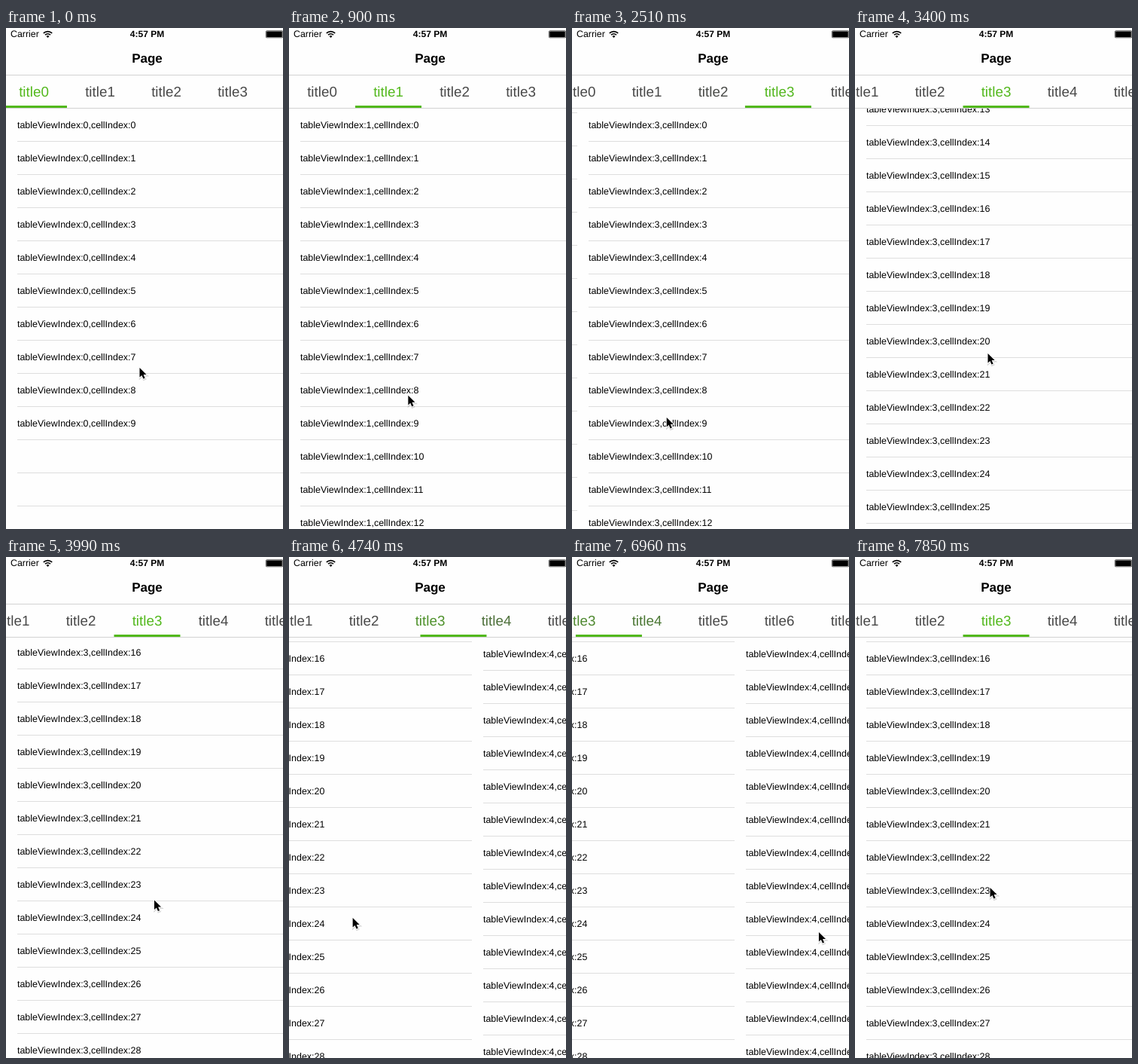
Animation of 368 by 665 pixels, one loop 8000 ms. Source, as an HTML page:

```html
<!DOCTYPE html>
<html lang="en">
<head>
<meta charset="utf-8">
<title>Paged tables</title>
<style>
html, body { margin: 0; width: 100%; height: 100%; overflow: hidden; background: #fefefe; }
body {
  position: relative; color: #000; white-space: nowrap;
  font-family: "Liberation Sans", Arial, sans-serif;
  text-rendering: geometricPrecision;
}
div, svg { position: absolute; }
#stage { left: 0; top: 0; width: 368px; height: 665px; overflow: hidden; }
.bar { left: 0; width: 375px; text-align: center; }
.rule { left: 0; width: 375px; height: 1px; background: #d2d2d2; }
#carrier { left: 6px; top: 0; font-size: 12.4px; line-height: 17px; }
#clock { top: 0; font-weight: bold; font-size: 12px; line-height: 17px; }
#heading { top: 20px; font-weight: bold; font-size: 17px; line-height: 41px; }
#tabs { left: 0; top: 63px; height: 43px; }
.tab { top: 0; width: 88px; text-align: center; font-size: 18.8px; line-height: 43px; }
#marker { left: 0; top: 40px; width: 88px; height: 3px; background: #52b81c; }
#lists { left: 0; top: 107px; width: 375px; height: 558px; overflow: hidden; }
#pages { left: 0; top: 0; }
.page { top: 0; width: 375px; height: 558px; overflow: hidden; }
.table {
  left: 15px; top: 0; width: 360px; height: 1408px;
  background: repeating-linear-gradient(transparent 0 43px, #dedede 43px 44px);
}
.cell { left: 0; font-size: 12.45px; line-height: 44px; }
#icons, #cursor { left: 0; top: 0; overflow: visible; }
</style>
</head>
<body>
<div id="stage">
  <div id="lists"><div id="pages"></div></div>
  <div id="carrier">Carrier</div>
  <div id="clock" class="bar">4:57 PM</div>
  <div id="heading" class="bar">Page</div>
  <div class="rule" style="top:62px"></div>
  <div class="rule" style="top:106px"></div>
  <div id="tabs"><div id="marker"></div></div>
  <svg id="icons" width="368" height="20">
    <g fill="none" stroke="#000" stroke-width="1.7">
      <path d="M49.8 6.9a8.2 8.2 0 0 1 11.4 0M52 9.2a5 5 0 0 1 7 0"/>
      <path d="M55.5 13l-2-2.1a2.9 2.9 0 0 1 4 0z" fill="#000" stroke="none"/>
    </g>
    <rect x="345.4" y="3.8" width="22.4" height="9" rx="1" fill="none" stroke="#222" stroke-width=".8"/>
    <rect x="346.2" y="4.6" width="20.6" height="7.4" rx=".5"/>
  </svg>
  <svg id="cursor" width="14" height="20">
    <defs><path id="arrow" d="M.5 1V13.6L3.4 10.9L5.4 15.6L7.6 14.7L5.6 10H9.6Z"/></defs>
    <use href="#arrow" x=".5" y="1.2" fill="none" stroke="#000" stroke-opacity=".16" stroke-width="2.4"/>
    <use href="#arrow" stroke="#fff" stroke-width="1.8" paint-order="stroke"/>
  </svg>
</div>
<script>
const LOOP = 8000, STEPS = 54, STEP = LOOP / STEPS;
const PAGE_WIDTH = 375, TAB_WIDTH = 88, ROW = 44, SCROLL_END = 698;
const SWIPE = 2.5, DRAG = 1.4, RECENTRE = 2;   // durations in steps
const GREEN = [82, 184, 28], GREY = [72, 72, 72];

// Each swipe brings in a page while the pointer drags from one x to another.
const swipes = [
  { at: 3.5, page: 1, from: 280, to: 90, y: 478 },
  { at: 9.035, page: 2, from: 345, to: 258, y: 511 },
  { at: 14.7, page: 3, from: 290, to: 110, y: 500 },
  { at: 31, page: 4, from: 217, to: 31, y: 478 },
  { at: 36.625, page: 5, from: 264, to: 64, y: 477 },
  { at: 43, page: 4, from: 110, to: 290, y: 495 },
  { at: 45.625, page: 3, from: 131, to: 331, y: 497 }
];
const FLICK = 20;

const ease = u => { u = Math.min(1, Math.max(0, u)); return u * u * (3 - 2 * u); };
const mix = (a, b, u) => a + (b - a) * u;
const glide = (moves, first, duration, step) =>
  moves.reduce((value, m) => mix(value, m.value, ease((step - m.at) / duration)), first);

const pageMoves = swipes.map(s => ({ at: s.at, value: s.page }));

// The tab strip centres the chosen title once a swipe has come to rest.
const tabCentre = page => Math.max(0, (page + .5) * TAB_WIDTH - PAGE_WIDTH / 2);
const tabMoves = [{ at: -1, value: 0 }].concat(swipes
  .filter((s, i) => i + 1 === swipes.length || swipes[i + 1].at > s.at + 3)
  .map(s => ({ at: s.at + 3, value: tabCentre(s.page) })));

const pointer = [
  { at: 0, x: 177, y: 450 },
  ...swipes.flatMap(s => [{ at: s.at, x: s.from, y: s.y }, { at: s.at + DRAG, x: s.to, y: s.y }]),
  { at: FLICK, x: 176, y: 569 },
  { at: FLICK + 1, x: 176, y: 431 },
  { at: FLICK + 3, x: 176, y: 431 },
  { at: FLICK + 9, x: 217, y: 478 },
  { at: STEPS - 1, x: 179, y: 438 }
].sort((a, b) => a.at - b.at);

function pointerAt(step) {
  const next = Math.max(1, pointer.findIndex(p => p.at >= step));
  const a = pointer[next - 1], b = pointer[next];
  const u = (step - a.at) / (b.at - a.at);
  return [mix(a.x, b.x, u), mix(a.y, b.y, u)];
}

// Drag, then decaying momentum, then a critically damped bounce at the end.
function flick(step) {
  const ms = (step - FLICK - 1) * STEP, hit = 395;
  if (ms < 0) return 137 * Math.max(0, step - FLICK);
  if (ms < hit) return 137 + 1020 * (1 - Math.pow(.998, ms));
  const s = (ms - hit) / 1000;
  return SCROLL_END + 1000 * s * Math.exp(-10.9 * s);
}

const byId = id => document.getElementById(id);
function add(parent, className, text = "") {
  const el = document.createElement("div");
  el.className = className;
  el.textContent = text;
  return parent.appendChild(el);
}
const move = (el, x, y = 0) => { el.style.transform = `translate(${x}px, ${y}px)`; };

const pages = byId("pages"), tabs = byId("tabs"), marker = byId("marker"), cursor = byId("cursor");
const tables = Array.from({ length: 6 }, (_, index) => {
  const page = add(pages, "page");
  page.style.left = index * PAGE_WIDTH + "px";
  const table = add(page, "table");
  for (let i = 0; i < (index ? 30 : 10); i++) {
    add(table, "cell", `tableViewIndex:${index},cellIndex:${i}`).style.top = i * ROW + "px";
  }
  return table;
});
const titles = Array.from({ length: 10 }, (_, i) => {
  const tab = add(tabs, "tab", "title" + i);
  tab.style.left = i * TAB_WIDTH + "px";
  return tab;
});
move(tables[2], 0, -SCROLL_END);

function draw(step) {
  const page = glide(pageMoves, 0, SWIPE, step);
  move(pages, -Math.round(page * PAGE_WIDTH));
  move(tables[3], 0, -Math.round(flick(step)));
  move(tabs, -glide(tabMoves, 14, RECENTRE, step));
  move(marker, page * TAB_WIDTH);
  titles.forEach((tab, i) => {
    const share = Math.max(0, 1 - Math.abs(page - i));
    tab.style.color = `rgb(${GREY.map((c, j) => Math.round(mix(c, GREEN[j], share)))})`;
  });
  move(cursor, ...pointerAt(step));
}

const start = performance.now();
function tick() {
  const time = (performance.now() - start) % LOOP;
  draw(Math.floor((time + 8) / STEP) % STEPS);
  requestAnimationFrame(tick);
}
tick();
</script>
</body>
</html>
```
